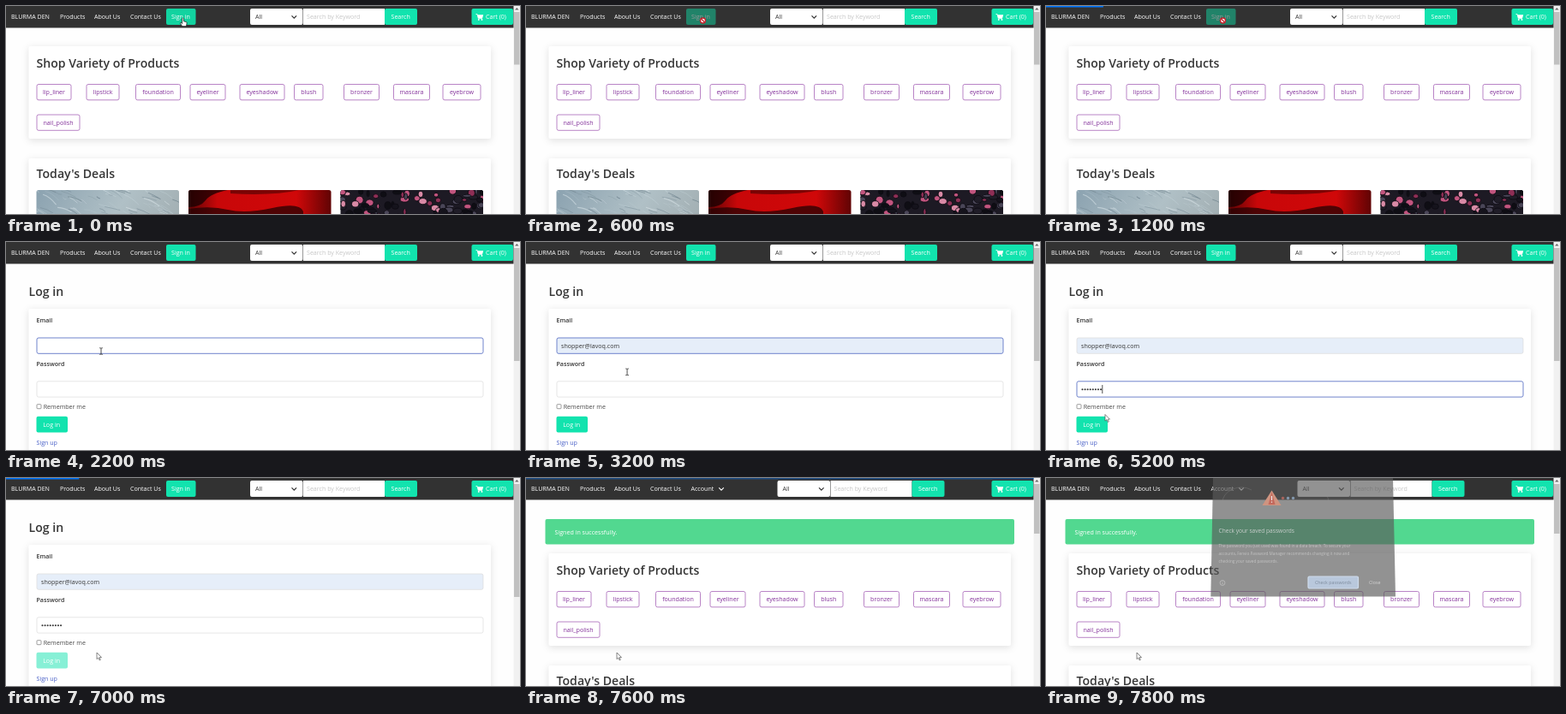
An HTML page that plays this animation: 600x243 px, repeating every 8000 ms.

```html
<!DOCTYPE html>
<html lang="en">
<head>
<meta charset="utf-8">
<title>Shop sign in</title>
<style>
  html, body { margin: 0; width: 100%; height: 100%; overflow: hidden; background: #fefefe; }
  svg { display: block; width: 100%; height: 100%; }
  text { font: 7.1px "Open Sans", "Noto Sans", sans-serif; white-space: pre; }
  text.title { font-size: 14.1px; font-weight: 600; }
  text.label { font-weight: 600; }
  .card { fill: #fff; filter: drop-shadow(0 2px 4px rgba(10, 10, 10, .12)); }
  .chip { fill: #fff; stroke: #a865b8; stroke-width: .8; }
</style>
</head>
<body>
<svg id="stage" viewBox="0 0 600 243" preserveAspectRatio="none"></svg>
<script>
const LOOP = 8000, STEP = 200;
const HOVER_CLICK = 400, LOGIN_PAGE = 1600, AUTOFILL = 3000, PASS_FOCUS = 3600;
const TYPE_START = 4000, SUBMIT = 5400, HOME_AGAIN = 7400, DIALOG = 7800;
const GREEN = '#12e3ae', INK = '#363636';

const rect = (x, y, w, h, fill, extra = '') =>
  `<rect x="${x}" y="${y}" width="${w}" height="${h}" fill="${fill}" ${extra}/>`;
const text = (x, y, str, fill = INK, extra = '') =>
  `<text x="${x}" y="${y}" fill="${fill}" ${extra}>${str}</text>`;
const line = (d, color, width = 1, extra = '') =>
  `<path d="${d}" fill="none" stroke="${color}" stroke-width="${width}" ${extra}/>`;
const group = (id, body) => `<g id="${id}">${body}</g>`;
const button = (x, y, w, h, label, tx) =>
  rect(x, y, w, h, GREEN, 'rx="2"') + text(tx, y + 12.2, label, '#fff');

function random(seed) {
  return () => (seed = (seed * 16807) % 2147483647) / 2147483647;
}

function navbar() {
  const cart = line('M548.5 9.6h1.6l1.3 5h4.6', '#fff', .9) +
    '<path d="M550.3 10.2h6.9l-1 3.7h-5z" fill="#fff"/>' +
    '<circle cx="551.8" cy="16" r=".9" fill="#fff"/><circle cx="555.5" cy="16" r=".9" fill="#fff"/>';
  const search = rect(285, 3, 61.5, 19, '#fff', 'rx="2"') + text(291, 15.3, 'All') +
    line('M333.5 11.4l2.8 2.8 2.8-2.8', INK, 1.3) +
    rect(347, 3, 95, 19, '#fff') + text(351, 15.3, 'Search by Keyword', '#c6c6c6') +
    button(442, 3, 38, 19, 'Search', 449.5);
  return rect(0, 0, 593, 25.5, '#323232') +
    [[6, 'BLURMA DEN'], [63, 'Products'], [103, 'About Us'], [145, 'Contact Us']]
      .map(([x, s]) => text(x, 15.3, s, '#fff')).join('') +
    group('signIn', button(187, 3, 34.5, 19, 'Sign in', 193)) +
    group('account', text(192.5, 15.3, 'Account', '#fff') + line('M225.2 11.4l2.8 2.8 2.8-2.8', '#fff', 1.1)) +
    group('search', search) +
    rect(543.5, 3, 48.5, 19, GREEN, 'rx="2"') + cart + text(560, 15.3, 'Cart (0)', '#fff');
}

function photos() {
  const rnd = random(77);
  const pick = list => list[Math.floor(rnd() * list.length)];
  let ripples = '', pots = '';
  for (let i = 0; i < 170; i++) {
    const x = 25 + rnd() * 175, y = 213 + rnd() * 80, len = 4 + rnd() * 14;
    ripples += line(`M${x} ${y}q${len / 2} ${rnd() * 3} ${len} ${len * (.2 + rnd() * .6)}`,
      pick(['#dbe6ea', '#c3d2d8', '#71858f', '#5f7480']), .4 + rnd() * .8, 'opacity=".55"');
  }
  for (let i = 0; i < 190; i++) {
    const fill = pick(['#c2557f', '#d98aa6', '#15131c', '#0f0e14', '#4a4658', '#8f2f56', '#201d28']);
    pots += `<ellipse cx="${390 + rnd() * 167}" cy="${215 + rnd() * 80}" rx="${1.5 + rnd() * 4}" ry="${1.5 + rnd() * 3}"
      fill="${fill}" stroke="#0e0c13" stroke-width=".9"/>`;
  }
  const frame = (i, x, body) =>
    `<clipPath id="ph${i}"><rect x="${x}" y="215" width="166.5" height="80" rx="2.5"/></clipPath>
     <g clip-path="url(#ph${i})">${body}</g>`;
  return frame(0, 35.5, rect(35, 215, 168, 80, 'url(#water)') + ripples) +
    frame(1, 213, rect(213, 215, 168, 80, 'url(#glow)') +
      '<path d="M213 215h46q-20 4-26 12t-20 8z" fill="#140102" opacity=".75"/>' +
      '<path d="M213 237q26-4 46 1t52-2 36 4v55H213z" fill="#240203" opacity=".75"/>' +
      '<path d="M262 215h80q-30 7-80 4z" fill="#2c0203" opacity=".5"/>') +
    frame(2, 390.5, rect(390, 215, 168, 80, '#1d1a24') + pots);
}

function home() {
  const names = ['lip_liner', 'lipstick', 'foundation', 'eyeliner', 'eyeshadow', 'blush',
    'bronzer', 'mascara', 'eyebrow', 'nail_polish'];
  const xs = [36, 94, 151.5, 215, 273, 336.5, 394.5, 452.5, 510, 36];
  const ws = [40, 38, 52, 41, 52, 33.5, 41, 42, 44, 50];
  const chips = names.map((name, i) => {
    const y = i < 9 ? 91.5 : 127;
    return rect(xs[i], y, ws[i], 18.3, '#fff', 'class="chip" rx="2"') +
      text(xs[i] + ws[i] / 2, y + 11.7, name, '#83309a', 'text-anchor="middle"');
  }).join('');
  return rect(26.5, 47, 539.5, 108, '#fff', 'class="card" rx="2"') +
    text(35.5, 72, 'Shop Variety of Products', INK, 'class="title"') + chips +
    rect(26.5, 178, 539.5, 160, '#fff', 'class="card" rx="2"') +
    text(35.5, 201.3, "Today's Deals", INK, 'class="title"') + photos();
}

function login() {
  const field = (id, y) => rect(36, y, 521, 18.3, '#fff', `id="${id}" rx="2"`);
  let dots = '';
  for (let i = 0; i < 8; i++) dots += `<circle class="dot" cx="${42.5 + i * 3.08}" cy="172.3" r="1.05" fill="${INK}"/>`;
  return text(26.5, 62.5, 'Log in', INK, 'class="title"') +
    rect(26.5, 78, 539.5, 200, '#fff', 'class="card" rx="2"') +
    text(35.5, 94.2, 'Email', INK, 'class="label"') + field('email', 112) +
    text(41, 124, 'shopper@lavoq.com', INK, 'id="address"') +
    text(35.5, 145, 'Password', INK, 'class="label"') + field('pass', 162.8) + dots +
    rect(0, 167, .8, 10, '#222', 'id="caret"') +
    rect(36, 189.7, 5, 5, '#fff', 'rx=".8" stroke="#767676" stroke-width=".7"') +
    text(43.7, 195.4, 'Remember me', '#4a4a4a') +
    group('submit', button(35.5, 203.7, 36.5, 18.8, 'Log in', 43.2)) +
    text(35.5, 236.8, 'Sign up', '#485fc7') + text(35.5, 247.6, 'Forgot your password?', '#485fc7');
}

function dialog() {
  const lines = ['The password you just used was found in a data breach. To secure your',
    'accounts, Fenvio Password Manager recommends changing it now and',
    'checking your saved passwords.'];
  const size = px => `style="font-size:${px}px"`;
  return '<path d="M195 0H405L408 138.5H192.3z" fill="#5a5a5a" opacity=".66"/>' +
    line('M196 38H405M206 29a22 18 0 0 1 34-15M330 28a26 20 0 0 0-36-18', '#929292', .7, 'opacity=".4"') +
    '<path d="M263.5 14.5l11 17.5h-22z" fill="#cf9480"/><path d="M263.5 16l4 15h-8z" fill="#c4695c"/>' +
    line('M263.5 21v5M263.5 27.5v1.3', '#eee', 1.2) +
    ['#a8645c', '#8398ae', '#8398ae'].map((c, i) => `<circle cx="${276.5 + i * 6}" cy="23.5" r="1.7" fill="${c}"/>`).join('') +
    text(201.5, 63.5, 'Check your saved passwords', '#c9cfcc', size(6.6)) +
    lines.map((s, i) => text(201.5, 80.5 + i * 9.4, s, '#c4c4c4', size(4.65))).join('') +
    '<circle cx="206" cy="122.5" r="2.9" fill="none" stroke="#c8c8c8" stroke-width=".7"/>' +
    line('M206 122v2M206 120.5v.7', '#c8c8c8', .7) +
    rect(306, 115, 58.5, 14, '#b9c8dc', 'rx="1.5" stroke="#cfdcec" stroke-width="1.2"') +
    text(335.3, 124, 'Check passwords', '#7d8b9d', size(5.3) + ' text-anchor="middle"') +
    text(377, 124, 'Close', '#d6d6d6', size(5.3));
}

function pointers() {
  return group('hand', '<path d="M-.9 .6q.9-1.2 1.8 0v3.2l3 .8q.9.3.7 1.4l-.6 3.7H-.8l-2.4-3.7q.4-1 1.3-.4l1 .9z" fill="#fff" stroke="#111" stroke-width=".7"/>') +
    group('ban', '<circle r="3" fill="#fff" stroke="#c4222c" stroke-width="1.4"/>' + line('M-2-2L2 2', '#c4222c', 1.3)) +
    group('beam', line('M-1.8-3.7H-.5L0-3.2L.5-3.7H1.8M0-3.4V3.6M-1.8 3.8H-.5L0 3.3L.5 3.8H1.8', '#222', .8)) +
    group('arrow', '<path d="M0 0v7.6l1.8-1.6 1.3 2.9 1.2-.5-1.2-2.8h2.4z" fill="#fff" stroke="#555" stroke-width=".7"/>');
}

const stage = document.getElementById('stage');
stage.innerHTML = `<defs>
  <linearGradient id="water" x2="1" y2=".3"><stop stop-color="#8ba2b0"/><stop offset=".6" stop-color="#b0c0c6"/><stop offset="1" stop-color="#a3b0b4"/></linearGradient>
  <linearGradient id="glow"><stop stop-color="#5a0304"/><stop offset=".2" stop-color="#c80709"/><stop offset=".75" stop-color="#d00809"/><stop offset="1" stop-color="#5c0304"/></linearGradient>
</defs>` + rect(0, 0, 600, 243, '#fefefe') +
  group('home', home()) + group('login', login()) +
  group('notice', rect(22.5, 48, 547.5, 29.5, '#52d890', 'rx="2"') + text(33.5, 65.8, 'Signed in successfully.', '#fff')) +
  navbar() +
  rect(592.5, 0, 7.5, 243, '#f1f1f1') + '<path d="M594 4.5l2.3-2.6 2.3 2.6z" fill="#666"/>' +
  rect(593, 7, 6.5, 61.5, '#c1c1c1', 'id="thumb"') +
  rect(0, 0, 0, 1.5, '#0076ff', 'id="bar"') +
  group('dialog', dialog()) + group('pointer', pointers());

const $ = id => document.getElementById(id);
const set = (id, name, value) => $(id).setAttribute(name, value);
const show = (id, on) => set(id, 'display', on ? 'inline' : 'none');
const dots = [...document.querySelectorAll('.dot')];

// time, x, y of the pointer
const PATH = [[0, 206.5, 14], [400, 206.5, 17], [1600, 206.5, 17], [2000, 111, 127.5], [2600, 111, 127.5],
  [3000, 116, 143], [3600, 124, 176.5], [4800, 124, 176.5], [5200, 69, 201.5], [5400, 62, 211],
  [5800, 62, 211], [6400, 106, 204], [8000, 106, 204]];

function pointerAt(t) {
  const i = Math.max(1, PATH.findIndex(k => k[0] > t));
  const [a, b] = [PATH[i - 1], PATH[i]];
  const p = (t - a[0]) / (b[0] - a[0]), e = p * p * (3 - 2 * p);
  return [a[1] + (b[1] - a[1]) * e, a[2] + (b[2] - a[2]) * e];
}

function pointerKind(t) {
  if (t < HOVER_CLICK) return 'hand';
  if (t < LOGIN_PAGE || (t >= SUBMIT && t <= 5800)) return 'ban';
  return t >= 2000 && t <= 4800 ? 'beam' : 'arrow';
}

// Jump to a tenth, trickle on, then fill up and fade when the page arrives
function progress(t, start, done) {
  if (t < start || t > done + 300) return null;
  if (t >= done) return { width: 593, opacity: t > done ? .4 : .8 };
  const s = t - start;
  return { width: 60 * Math.min(1, s / 300) + Math.max(0, s - 300) * .023, opacity: 1 };
}

function styleField(id, focused, filled) {
  set(id, 'stroke', focused ? '#6f83cc' : '#dbdbdb');
  set(id, 'stroke-width', focused ? 1 : .7);
  set(id, 'fill', filled ? '#e6eef9' : '#fff');
}

function draw(t) {
  const inLogin = t >= LOGIN_PAGE && t < HOME_AGAIN, signedIn = t >= HOME_AGAIN;
  show('login', inLogin);
  show('home', !inLogin);
  set('home', 'transform', `translate(0 ${signedIn ? 41 : 0})`);
  show('notice', signedIn);
  show('signIn', !signedIn);
  show('account', signedIn);
  set('search', 'transform', `translate(${signedIn ? 8.5 : 0} 0)`);
  set('thumb', 'height', inLogin ? 132 : signedIn ? 58 : 61.5);

  $('signIn').firstChild.setAttribute('fill', t < LOGIN_PAGE ? '#12d3a0' : GREEN);
  set('signIn', 'opacity', t >= HOVER_CLICK && t < LOGIN_PAGE ? .5 : 1);
  set('submit', 'opacity', t >= SUBMIT ? .5 : 1);

  const inPass = t >= PASS_FOCUS && t < SUBMIT;
  const typed = Math.max(0, Math.min(8, Math.floor((t - TYPE_START) / 100)));
  styleField('email', t < PASS_FOCUS, t >= AUTOFILL);
  styleField('pass', inPass, false);
  show('address', t >= AUTOFILL);
  dots.forEach((d, i) => d.setAttribute('display', i < typed ? 'inline' : 'none'));
  const typing = typed > 0 && typed < 8;
  show('caret', inPass && (typing || Math.floor(t / 600) % 2 === 0));
  set('caret', 'x', 40.8 + typed * 3.08);

  const bar = progress(t, 600, LOGIN_PAGE) || progress(t, 5600, HOME_AGAIN);
  set('bar', 'width', bar ? bar.width : 0);
  set('bar', 'opacity', bar ? bar.opacity : 0);

  show('dialog', t >= DIALOG);
  const [x, y] = pointerAt(t), kind = pointerKind(t);
  set('pointer', 'transform', `translate(${x} ${y})`);
  ['hand', 'ban', 'beam', 'arrow'].forEach(k => show(k, k === kind));
}

const start = performance.now();
function tick() {
  const t = (performance.now() - start) % LOOP;
  draw(Math.floor(t / STEP) * STEP);
  requestAnimationFrame(tick);
}
tick();
</script>
</body>
</html>
```
